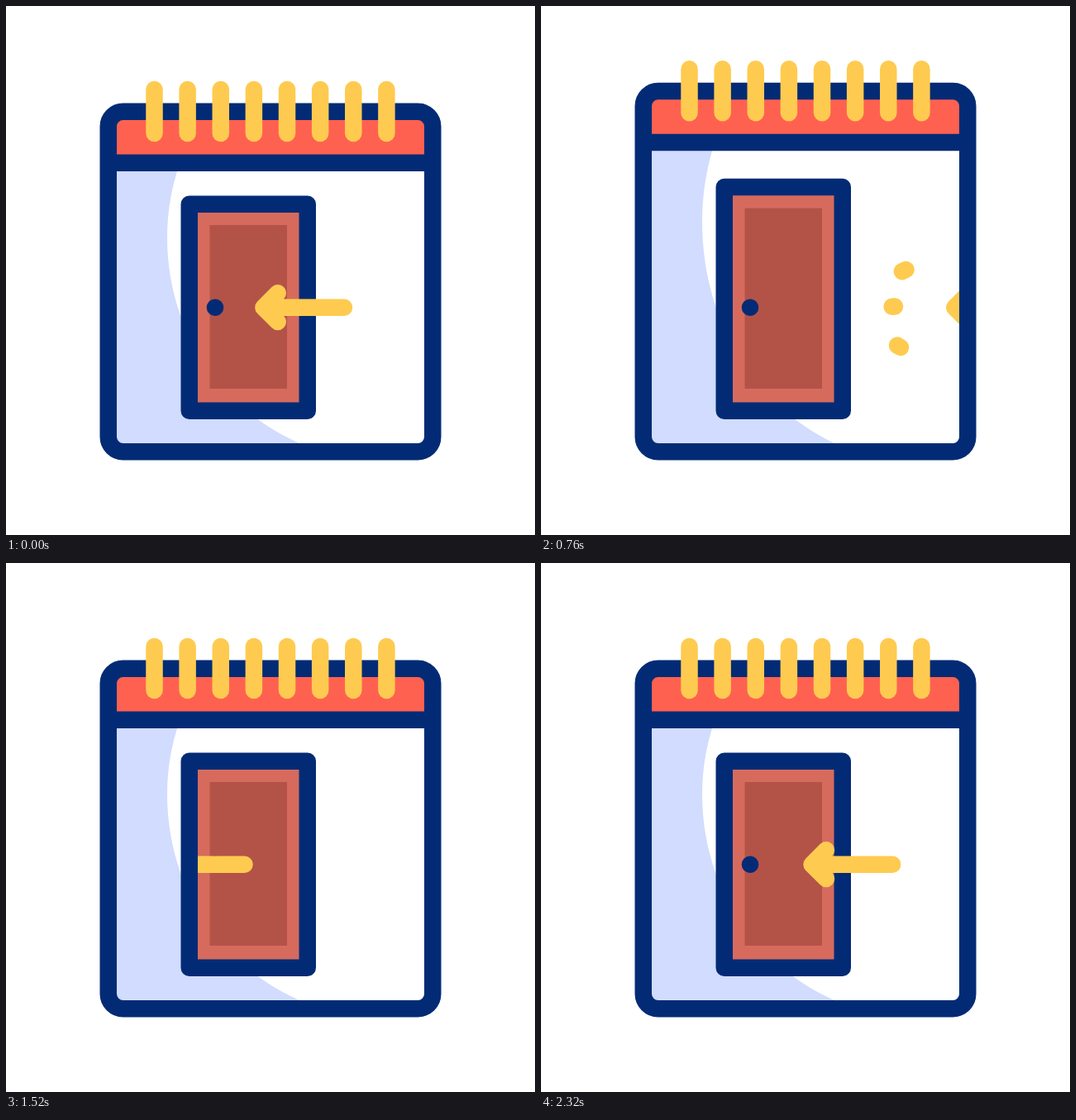
Animation, 640 px wide and 640 px high, one loop 2.36 s. Source, as an HTML page:

```html
<!DOCTYPE html>
<html lang="en">
<head>
<meta charset="utf-8">
<title>Calendar door</title>
<style>
  html, body { margin: 0; width: 100%; height: 100%; overflow: hidden; background: #fff; }
  svg { display: block; width: 100vw; height: 100vh; }
</style>
</head>
<body>
<svg viewBox="0 0 640 640">
  <defs>
    <clipPath id="lane"><rect x="232" y="300" width="274" height="130"/></clipPath>
  </defs>
  <path id="shade" fill="#d1dcfe"/>
  <g id="top">
    <rect x="124" y="128" width="392" height="60" rx="17" fill="#ff6150"/>
    <path d="M124 189.8H516" stroke="#032b75" stroke-width="20.5"/>
  </g>
  <rect id="page" x="123.75" width="392.5" rx="18" fill="none" stroke="#032b75" stroke-width="20.5"/>
  <g id="rings" stroke="#fecb50" stroke-width="20.5" stroke-linecap="round"></g>
  <rect id="door" x="221.75" width="143" fill="#d66b5d" stroke="#032b75" stroke-width="20.5" stroke-linejoin="round"/>
  <rect id="panel" x="246.5" width="93.5" fill="#b35348"/>
  <circle cx="253" cy="364.7" r="10.3" fill="#032b75"/>
  <g id="sparks" stroke="#fecb50" stroke-linecap="round"></g>
  <g clip-path="url(#lane)">
    <path id="arrow" d="M27.8 -17.4L10.4 0L27.8 17.4M10.4 0H108" fill="none" stroke="#fecb50"
      stroke-width="20.5" stroke-linecap="round" stroke-linejoin="round"/>
  </g>
</svg>
<script>
const LOOP = 2360, STEP = 40, CYCLE = 1132.5, LAG = 95;
const $ = id => document.getElementById(id);
const clamp = v => Math.max(0, Math.min(1, v));
const part = (t, a, b) => clamp((t - a) / (b - a));
const sine = u => (1 - Math.cos(Math.PI * u)) / 2;
const easeOut = u => 1 - (1 - u) ** 2;
const mix = (a, b, u) => a + (b - a) * u;

function set(el, attrs) {
  for (const k in attrs) el.setAttribute(k, attrs[k]);
}
function addLine(parent) {
  return parent.appendChild(document.createElementNS("http://www.w3.org/2000/svg", "line"));
}

for (let i = 0; i < 8; i++) {
  const x = 179.5 + i * 40.13;
  set(addLine($("rings")), { x1: x, x2: x, y1: 101, y2: 154 });
}

// start and end of each spark's path
const sparks = [
  [394.2, 340, 441.5, 319],
  [394.2, 365, 428, 363.5],
  [394.5, 389.5, 435, 413]
].map(path => ({ path, el: addLine($("sparks")) }));

// rise, short hold, fall back
const bump = (t, a, b, c, d) => sine(part(t, a, b)) - sine(part(t, c, d));

function drawPage(p) {
  const up = 25.5 * bump(p, 390, 720, 743, 908);
  const doorUp = 21 * bump(p, 375, 710, 750, 940);
  const panelUp = 21 * bump(p, 390, 720, 743, 908);
  const move = `translate(0 ${-up})`;
  set($("top"), { transform: move });
  set($("rings"), { transform: move });
  set($("page"), { y: 127.75 - up, height: 411.5 + up });
  set($("door"), { y: 239.75 - doorUp, height: 250 + doorUp });
  set($("panel"), { y: 265 - panelUp, height: 198 + panelUp });
  const k = (329 + up) / 329;
  const y = v => 529 - (529 - v) * k;
  set($("shade"), {
    d: `M130 ${y(196)}H208L207 ${y(200)}C199 ${y(226)} 195 ${y(252)} 195 ${y(280)}` +
       `C195 ${y(390)} 257 ${y(486)} 355 529V534H130Z`
  });
}

function drawSparks(p) {
  const head = mix(0.14, 1, easeOut(part(p, 515, 690)));
  const tail = mix(0, 0.9, easeOut(part(p, 540, 750)));
  const size = 20.5 * part(p, 470, 510) * (1 - part(p, 800, 880));
  for (const { path: [x, y, ex, ey], el } of sparks) {
    set(el, {
      x1: mix(x, ex, tail), y1: mix(y, ey, tail),
      x2: mix(x, ex, head), y2: mix(y, ey, head),
      "stroke-width": size, visibility: size ? "visible" : "hidden"
    });
  }
}

function draw(t) {
  // gentle start, then constant speed
  const run = t < 2 * LAG ? t * t / (4 * LAG) : t - LAG;
  const q = run % CYCLE;
  const tip = q < 600 ? 301 - 0.412 * q : 301 + 0.404 * (CYCLE - q);
  set($("arrow"), { transform: `translate(${tip} 364.7)` });
  drawPage(q + LAG);
  drawSparks(q + LAG);
}

const begin = performance.now();
function tick() {
  const t = (performance.now() - begin) % LOOP;
  draw(Math.floor(t / STEP) * STEP);
  requestAnimationFrame(tick);
}
tick();
</script>
</body>
</html>
```
